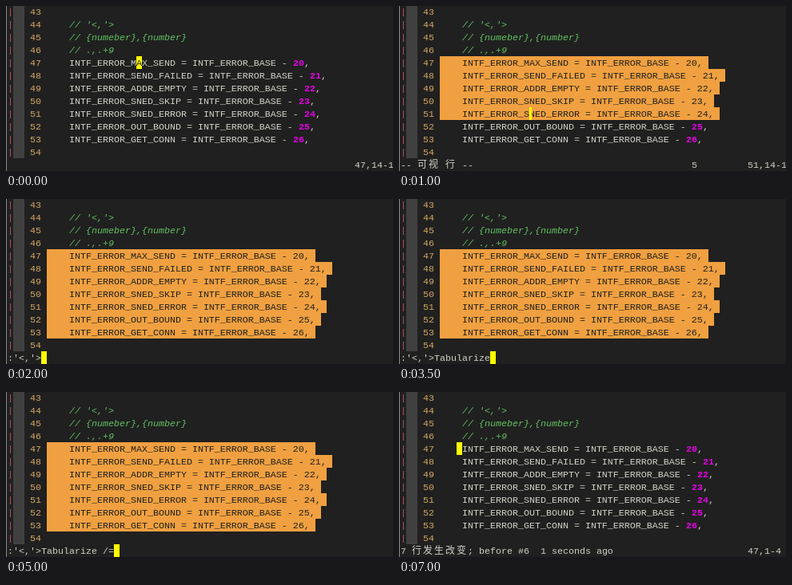
Write an HTML page that moves like this. It is 484x207 px and loops after 8 s.

```html
<!DOCTYPE html>
<html lang="en">
<head>
<meta charset="utf-8">
<title>Aligning code in an editor</title>
<style>
html, body { margin: 0; width: 100%; height: 100%; overflow: hidden; background: #202020; }
svg { display: block; }
text { font: 11.665px "Liberation Mono", "Courier New", monospace; white-space: pre; }
.bold { font-weight: bold; }
.italic { font-style: italic; }
.cjk { font: 12px "Noto Sans CJK SC", "Noto Sans CJK", sans-serif; letter-spacing: 2px; }
</style>
</head>
<body>
<svg id="stage" width="484" height="207" xmlns="http://www.w3.org/2000/svg"></svg>
<script>
const LOOP = 8000, CELL = 7, LINE = 16, FIRST = 43, CODE_COL = 7, STATUS_ROW = 12;
const COLOR = {
  back: '#202020', edge: '#8c8c8c', gutter: '#404040', bar: '#b8505c', number: '#d8a860',
  text: '#d2d2c8', comment: '#62c462', digit: '#e800e8', select: '#f0a040', cursor: '#ffff00',
  dark: '#202020'
};
const comments = { 44: "// '<,'>", 45: '// {numeber},{number}', 46: '// .,.+9' };
const names = ['MAX_SEND', 'SEND_FAILED', 'ADDR_EMPTY', 'SNED_SKIP', 'SNED_ERROR', 'OUT_BOUND', 'GET_CONN']
  .map(name => 'INTF_ERROR_' + name);
const widest = Math.max(...names.map(name => name.length));

// Each step holds from its time until the next one.
const visual = (at, line) => ({
  at, selected: line, cursor: [line, 16, 'bar'], mode: true, count: line - 46, ruler: line + ',14-1'
});
const command = (at, typed, cursor = true) => ({
  at, selected: 53, status: ":'<,'>" + typed, prompt: cursor
});
const steps = [
  { at: 0, cursor: [47, 16, 'A'], ruler: '47,14-1' },
  visual(500, 48),
  visual(1000, 51),
  visual(1500, 53),
  command(2000, ''),
  command(3000, 'Ta'),
  command(3500, 'Tabularize'),
  command(4000, 'Tabularize', false),
  command(4500, 'Tabularize /'),
  command(5000, 'Tabularize /='),
  { at: 6000, aligned: true, cursor: [47, 3, ''], status: ":'<,'>Tabularize /=", ruler: '47,1-4' },
  { at: 7000, cursor: [47, 3, ''], changed: true, ruler: '47,1-4' }
];

const colX = col => 2 + col * CELL;
const rowY = row => row * LINE - 1;
const escapeText = s => String(s).replace(/&/g, '&amp;').replace(/</g, '&lt;').replace(/>/g, '&gt;');
const rect = (x, y, w, h, fill) =>
  `<rect x="${x}" y="${y}" width="${w}" height="${h}" fill="${fill}" shape-rendering="crispEdges"/>`;
const write = (col, row, content, fill = COLOR.text, style = '') =>
  `<text x="${colX(col)}" y="${rowY(row) + 12}" fill="${fill}" class="${style}">${escapeText(content)}</text>`;

function codeLine(line, step) {
  const row = line - FIRST, start = CODE_COL + 4;
  if (comments[line]) return write(start, row, comments[line], COLOR.comment, 'italic');
  const name = names[line - 47];
  if (!name) return '';
  const head = (step.aligned ? name.padEnd(widest) : name) + ' = INTF_ERROR_BASE - ';
  const digits = String(line - 27), end = start + head.length + digits.length;
  if (line <= step.selected) {
    return rect(colX(CODE_COL), rowY(row), (end + 2 - CODE_COL) * CELL, LINE, COLOR.select) +
      write(start, row, head + digits + ',', COLOR.dark);
  }
  return write(start, row, head) +
    write(start + head.length, row, digits, COLOR.digit, 'bold') +
    write(end, row, ',');
}

function cursorMark([line, col, mark]) {
  const row = line - FIRST, at = CODE_COL + col;
  if (mark === 'bar') return rect(colX(at), rowY(row), 3, LINE, COLOR.cursor);
  return rect(colX(at), rowY(row), CELL, LINE, COLOR.cursor) + write(at, row, mark, COLOR.dark);
}

function statusLine(step) {
  let out = '';
  const put = (col, content, style) => { out += write(col, STATUS_ROW, content, COLOR.text, style); };
  if (step.status) put(0, step.status);
  if (step.prompt) {
    out += rect(colX(step.status.length), rowY(STATUS_ROW), CELL, LINE, COLOR.cursor);
  }
  if (step.mode) {
    put(0, '--');
    put(3, '可视', 'cjk');
    put(8, '行', 'cjk');
    put(11, '--');
    put(52, step.count);
  }
  if (step.changed) {
    put(0, '7');
    put(2, '行发生改变', 'cjk');
    put(12, '; before #6  1 seconds ago');
  }
  if (step.ruler) put(62, step.ruler);
  return out;
}

function picture(step) {
  let out = rect(0, 0, 484, 207, COLOR.back) + rect(0, 0, 1, 207, COLOR.edge) +
    rect(colX(1), 0, 2 * CELL, rowY(STATUS_ROW), COLOR.gutter);
  for (let line = FIRST; line <= 54; line++) {
    const row = line - FIRST;
    out += write(0, row, '|', COLOR.bar) + write(4, row, line, COLOR.number) + codeLine(line, step);
  }
  if (step.cursor) out += cursorMark(step.cursor);
  return out + statusLine(step);
}

const stage = document.getElementById('stage');
const begin = performance.now();
let shown = null;

function draw() {
  const time = (performance.now() - begin) % LOOP;
  const step = steps.filter(s => s.at <= time).pop();
  if (step !== shown) {
    stage.innerHTML = picture(step);
    shown = step;
  }
  requestAnimationFrame(draw);
}
draw();
</script>
</body>
</html>
```
